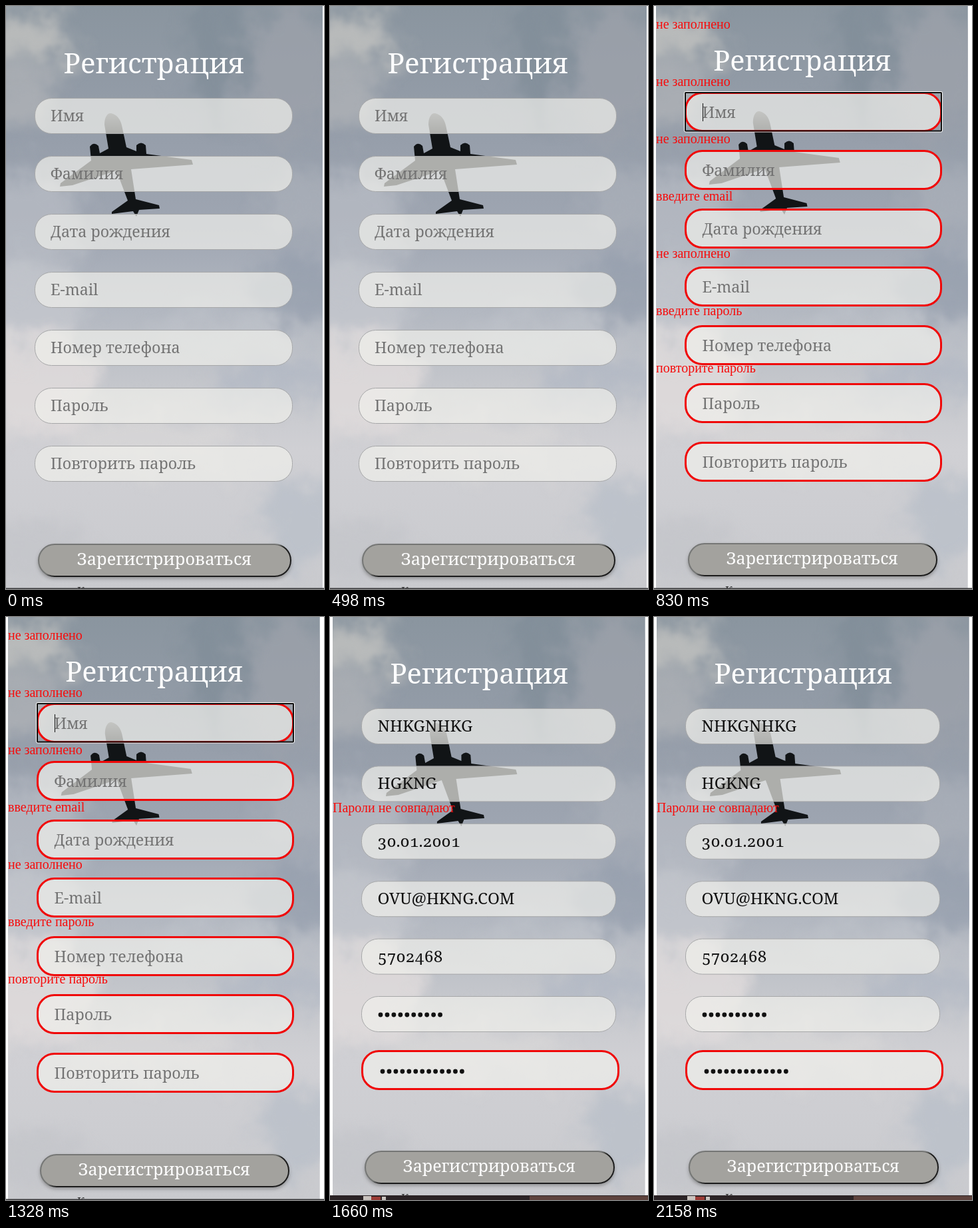
Animation of 478 by 875 pixels, one loop 2.49 s. Source, as an HTML page:

```html
<!DOCTYPE html>
<html lang="ru">
<head>
<meta charset="utf-8">
<title>Регистрация</title>
<style>
  html, body { margin: 0; width: 100%; height: 100%; overflow: hidden; background: #fff; }
  svg { display: block; width: 478px; height: 875px; }
  text { font-family: Georgia, "Noto Serif", serif; font-variant-numeric: oldstyle-nums; }
  .mid { text-anchor: middle; fill: #fff; }
  .note { font: 20px "Liberation Serif", "Times New Roman", serif; fill: #f60c0c; }
</style>
</head>
<body>
<svg id="stage" viewBox="0 0 478 875" xmlns="http://www.w3.org/2000/svg">
  <defs>
    <linearGradient id="sky" x2="0" y2="1">
      <stop offset="0" stop-color="#8a959f"/>
      <stop offset=".22" stop-color="#969eaa"/>
      <stop offset=".38" stop-color="#9fa6b2"/>
      <stop offset=".52" stop-color="#b3b8c1"/>
      <stop offset=".65" stop-color="#c5c7cc"/>
      <stop offset=".76" stop-color="#d0d0d4"/>
      <stop offset="1" stop-color="#c9cace"/>
    </linearGradient>
    <linearGradient id="hull" gradientUnits="userSpaceOnUse" x1="0" y1="160" x2="0" y2="194">
      <stop offset="0" stop-color="#606365"/>
      <stop offset="1" stop-color="#111416"/>
    </linearGradient>
    <linearGradient id="bevel" x2="1" y2="1">
      <stop offset=".48" stop-color="#747674"/>
      <stop offset=".53" stop-color="#1d1d1d"/>
    </linearGradient>
    <filter id="puff" filterUnits="userSpaceOnUse" x="-80" y="-80" width="640" height="1040" color-interpolation-filters="sRGB">
      <feGaussianBlur stdDeviation="15" result="soft"/>
      <feTurbulence type="fractalNoise" baseFrequency=".017" numOctaves="4" seed="5"/>
      <feDisplacementMap in="soft" scale="85" xChannelSelector="R" yChannelSelector="G"/>
      <feGaussianBlur stdDeviation="1.5"/>
    </filter>
    <filter id="shade" x="-5%" y="-20%" width="110%" height="150%">
      <feDropShadow dx="0" dy="3" stdDeviation="2.5" flood-color="#555" flood-opacity=".45"/>
    </filter>
    <clipPath id="photo"><path d="M0 0H476V878H0z"/></clipPath>
    <g id="back" clip-path="url(#photo)">
      <rect width="476" height="880" fill="url(#sky)"/>
      <g id="clouds" filter="url(#puff)"/>
      <path fill="url(#hull)" d="M148 178C148 166 153 160 158 161C167 163 172 170 174 179L181 212L196 218L196 209Q203 202 210 209L211 222L279 231L281 238L188 245L195 290L230 299L231 304L200 306L196 316L191 308L159 312L159 309L183 292L166 247L100 269L81 271L82 266L128 232L126 211Q132 203 139 210L141 221L154 214Z"/>
    </g>
  </defs>
</svg>
<script>
const NS = "http://www.w3.org/2000/svg";
const stage = document.getElementById("stage");
const LOOP = 2490, COUNT = 3;

function add(parent, tag, attrs, label) {
  const el = document.createElementNS(NS, tag);
  for (const k in attrs) el.setAttribute(k, attrs[k]);
  if (label) el.textContent = label;
  parent.append(el);
  return el;
}

// x, y, rx, ry, colour, opacity
[
  [15, 45, 85, 42, "#c3c3c1", .8],
  [10, 140, 75, 45, "#b0b3b7", .75],
  [315, 70, 45, 100, "#7f8c98", .7],
  [430, 95, 70, 105, "#9fa3ab", .7],
  [20, 330, 100, 80, "#b9bcc4", .75],
  [10, 450, 110, 65, "#c5c7cd", .8],
  [450, 290, 65, 40, "#adb2bb", .6],
  [460, 425, 90, 45, "#949eac", .75],
  [330, 490, 100, 25, "#bfc3ca", .7],
  [20, 570, 115, 80, "#e2dcdc", .8],
  [410, 565, 100, 32, "#b0b7c3", .7],
  [220, 650, 130, 45, "#d9d8d8", .7],
  [440, 770, 65, 60, "#b7bec8", .7],
  [30, 815, 95, 40, "#c1c3c9", .6]
].forEach(([cx, cy, rx, ry, fill, opacity]) =>
  add(document.getElementById("clouds"), "ellipse", { cx, cy, rx, ry, fill, opacity }));

const hints = ["Имя", "Фамилия", "Дата рождения", "E-mail", "Номер телефона", "Пароль", "Повторить пароль"];

function page(place, title, button) {
  const g = add(stage, "g", { visibility: "hidden" });
  add(g, "use", { href: "#back", transform: place });
  add(g, "text", { class: "mid", x: title.x, y: title.y, "font-size": title.size }, "Регистрация");
  add(g, "text", { x: 107, y: button.y + 77, "font-size": 16, fill: "#333" }, "К");
  add(g, "rect", { x: button.x + 1, y: button.y + 1, width: button.w - 2, height: 48, rx: 24,
    fill: "#a3a29e", stroke: "url(#bevel)", "stroke-width": 2, filter: "url(#shade)" });
  add(g, "text", { class: "mid", x: button.x + button.w / 2 - 1, y: button.y + 32, "font-size": button.size }, "Зарегистрироваться");
  return g;
}

function field(g, x, y, w, h, red) {
  const b = red ? 3 : 1;
  add(g, "rect", { x: x + b / 2, y: y + b / 2, width: w - b, height: h - b, rx: 25,
    fill: "rgba(240,239,235,.7)", stroke: red ? "#f00808" : "#a6a7a8", "stroke-width": b });
}

function line(g, x, y, label, size = 23.3, fill = "#737373") {
  add(g, "text", { x, y, "font-size": size, fill }, label);
}

function note(g, x, y, label) {
  add(g, "text", { class: "note", x, y }, label);
}

function dots(g, x, y, n) {
  for (let i = 0; i < n; i++) add(g, "circle", { cx: x + i * 9.95, cy: y, r: 3.4, fill: "#111" });
}

function floor(g, y, fill) {
  add(g, "rect", { y, width: 478, height: 875 - y, fill });
}

function emptyForm() {
  const g = page("", { x: 222, y: 101, size: 42.2 }, { x: 48, y: 807, w: 381, size: 25.4 });
  hints.forEach((hint, i) => {
    const y = 138 + i * 87;
    field(g, 43, y, 388, 54);
    line(g, 67, y + 35, hint);
  });
  floor(g, 873.5, "#3b3b3d");
  return g;
}

function missingForm() {
  const g = page("translate(3 -3) scale(.985 1)", { x: 222.5, y: 97, size: 41.5 }, { x: 51, y: 806, w: 375, size: 25 });
  const none = "не заполнено";
  const notes = [none, none, none, "введите email", none, "введите пароль", "повторите пароль"];
  hints.forEach((hint, i) => {
    const y = 129 + Math.floor(i * 87.5);
    field(g, 46, y, 387, 60, true);
    line(g, 72.5, y + 39, hint);
    note(g, 3, 34 + i * 86, notes[i]);
  });
  add(g, "rect", { x: 45.5, y: 128.5, width: 388, height: 60.5, rx: 2, fill: "none", stroke: "#fff" });
  add(g, "rect", { x: 47, y: 130, width: 385, height: 57.5, rx: 1, fill: "none", stroke: "#101010", "stroke-width": 2 });
  add(g, "rect", { x: 73, y: 146, width: 1, height: 27, fill: "#111" });
  floor(g, 873.5, "#3b3b3d");
  return g;
}

function mismatchForm() {
  const g = page("translate(4 -2) scale(.987 1)", { x: 224, y: 100, size: 41.6 }, { x: 52, y: 801, w: 376, size: 25.1 });
  const values = ["NHKGNHKG", "HGKNG", "30.01.2001", "OVU@HKNG.COM", "5702468", ""];
  values.forEach((value, i) => {
    const y = 137 + i * 86.4;
    field(g, 47, y, 383, 54);
    line(g, 71.5, y + 35, value, 24.2, "#111");
  });
  field(g, 47, 650, 388, 60, true);
  dots(g, 76, 597, 10);
  dots(g, 79, 682, 13);
  note(g, 4, 293, "Пароли не совпадают");
  floor(g, 868, "#2b2325");
  add(g, "path", { d: "M62 870H76V875H62z", fill: "#9b3b35" });
  add(g, "path", { d: "M50 869H62V875H50zM78 870H84V875H78z", fill: "#c9c2bd" });
  add(g, "path", { d: "M300 869H478V875H300z", fill: "#5e433d" });
  return g;
}

[emptyForm(), missingForm(), mismatchForm()].forEach((g, i) => {
  const steps = [];
  for (let k = 0; k <= COUNT; k++)
    steps.push({ offset: k / COUNT, visibility: k % COUNT === i ? "visible" : "hidden", easing: "steps(1, end)" });
  g.animate(steps, { duration: LOOP, iterations: Infinity }).startTime = 0;
});
</script>
</body>
</html>
```
